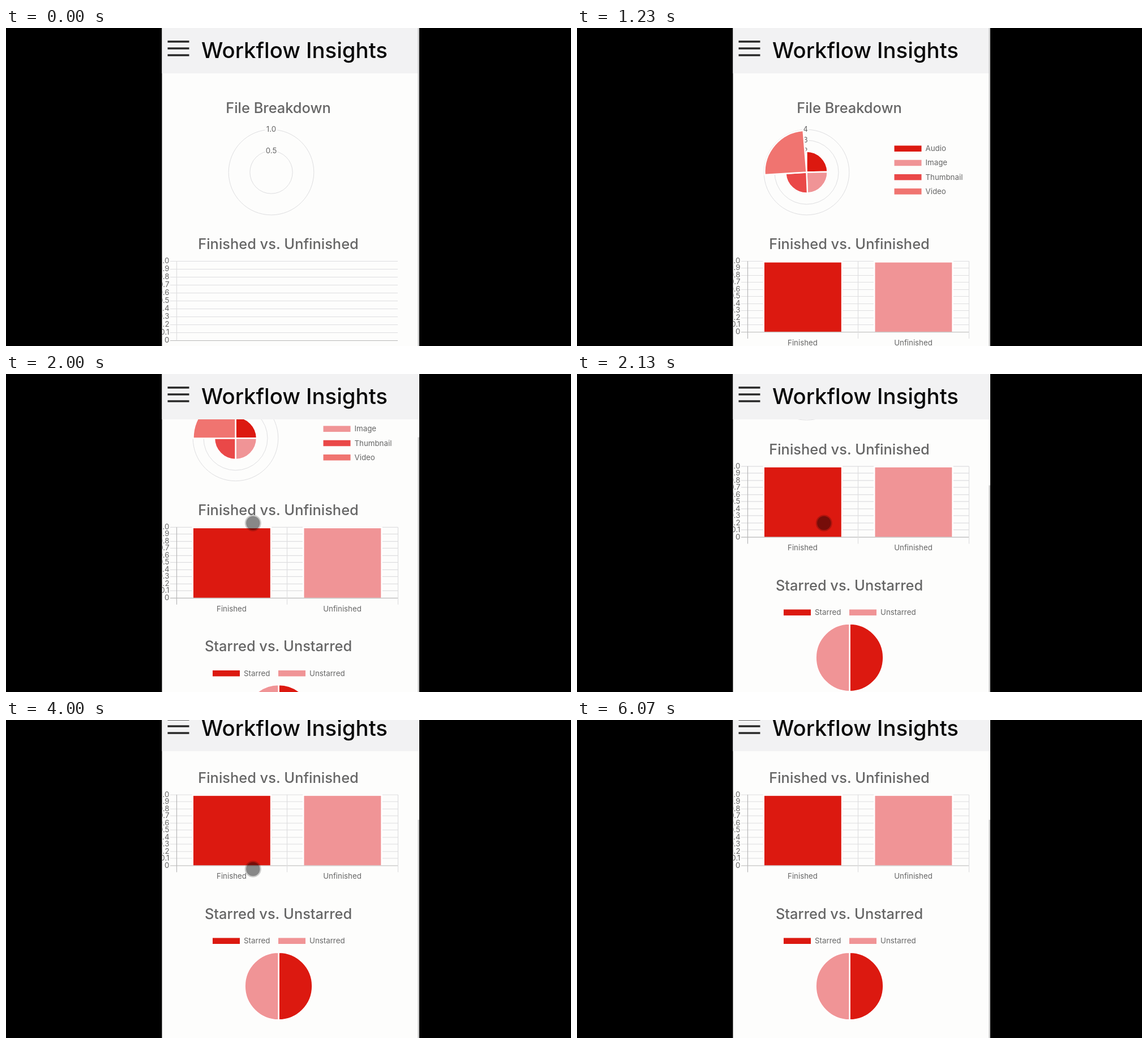
Animation of 998 by 561 pixels, one loop 6.13 s. Source, as an HTML page with a canvas:

```html
<!DOCTYPE html>
<html lang="en">
<head>
<meta charset="utf-8">
<title>Workflow Insights</title>
<style>
  html, body { margin: 0; width: 100%; height: 100%; overflow: hidden; background: #000; }
  canvas { display: block; width: 998px; height: 561px; }
</style>
</head>
<body>
<canvas id="stage" width="998" height="561"></canvas>
<script>
const ctx = document.getElementById('stage').getContext('2d');
const LOOP = 6130;
const DATA_AT = 30;
const FONT = 'Inter, "Open Sans", sans-serif';
const RED = '#dc1910', PINK = '#f09496', ROSE = '#ea4848', CORAL = '#f07470';
const PAGE = '#fdfdfc', GRID = '#dedee0', AXIS = '#b8b8b8', INK = '#666';

// [time, value] stops
const SCROLL = [[1830, 0], [1870, 7.5], [1930, 50], [2000, 140], [2060, 208],
  [2130, 248.5], [2200, 253], [2300, 254.5]];
const PAGE_SHIFT = [[2670, 0], [2700, 1.5], [2800, 14], [2900, 21], [3000, 24], [3070, 25]];
const POINTER = [[1600, 0], [1720, 1], [4400, 1], [4530, 0]];

const clamp = x => Math.max(0, Math.min(1, x));
const easeOutQuart = p => 1 - (1 - clamp(p)) ** 4;

function valueAt(stops, t) {
  if (t <= stops[0][0]) return stops[0][1];
  for (let i = 1; i < stops.length; i++) {
    const [t0, a] = stops[i - 1], [t1, b] = stops[i];
    if (t < t1) return a + (b - a) * (t - t0) / (t1 - t0);
  }
  return stops[stops.length - 1][1];
}

function text(str, x, y, size, { color = INK, weight = 400, align = 'center' } = {}) {
  ctx.font = `${weight} ${size}px ${FONT}`;
  ctx.fillStyle = color;
  ctx.textAlign = align;
  ctx.fillText(str, x, y + size * 0.36);
}

const heading = (str, y) => text(str, 481, y, 25.4, { weight: 500 });
const label = (str, x, y, align) => text(str, x, y, 13.3, { align });

function rect(x, y, w, h, color) {
  ctx.fillStyle = color;
  ctx.fillRect(x, y, w, h);
}

function line(x0, y0, x1, y1, color) {
  ctx.strokeStyle = color;
  ctx.lineWidth = 1.2;
  ctx.beginPath();
  ctx.moveTo(x0, y0);
  ctx.lineTo(x1, y1);
  ctx.stroke();
}

function disc(x, y, r, color) {
  ctx.fillStyle = color;
  ctx.beginPath();
  ctx.arc(x, y, r, 0, Math.PI * 2);
  ctx.fill();
}

function wedge(x, y, r, from, to, color) {
  ctx.beginPath();
  ctx.moveTo(x, y);
  ctx.arc(x, y, r, from, to);
  ctx.closePath();
  ctx.fillStyle = color;
  ctx.fill();
  ctx.strokeStyle = '#fff';
  ctx.lineWidth = 2.4;
  ctx.stroke();
}

function legend(str, x, y, color) {
  rect(x, y - 5, 48, 10.5, color);
  label(str, x + 55, y, 'left');
}

function rings(x, y, names) {
  const r = 75.3, n = names.length;
  names.forEach((name, i) => {
    const ring = r * (i + 1) / n;
    ctx.strokeStyle = GRID;
    ctx.lineWidth = 1;
    ctx.beginPath();
    ctx.arc(x, y, ring, 0, Math.PI * 2);
    ctx.stroke();
    const w = name.length > 1 ? 22 : 12;
    const tx = name.length > 1 ? x : x - 2;
    rect(tx - w / 2, y - ring - 8, w, 16, PAGE);
    label(name, tx, y - ring - 0.5);
  });
}

function polarChart(t) {
  heading('File Breakdown', 141);
  if (t < DATA_AT) {
    rings(468.5, 254.5, ['0.5', '1.0']);
    return;
  }
  const x = 405.5, y = 254.5;
  rings(x, y, ['1', '2', '3', '4']);
  const p = easeOutQuart((t - DATA_AT) / 1810);
  const parts = [['Audio', 2, RED], ['Image', 2, PINK], ['Thumbnail', 2, ROSE], ['Video', 4, CORAL]];
  const turn = Math.PI / 2 * p;
  parts.forEach(([name, value, color], i) => {
    const from = -Math.PI / 2 + i * turn;
    if (p > 0) wedge(x, y, 75 * value / 4 * p, from, from + turn, color);
    legend(name, 560.5, 212.5 + i * 25.2, color);
  });
}

function barChart(t) {
  heading('Finished vs. Unfinished', 381);
  const ready = t >= DATA_AT;
  const top = 411.3, base = ready ? 536.3 : 551.3, step = (base - top) / 10;
  for (let i = 0; i <= 10; i++) {
    const y = Math.floor(base - i * step + 0.01) + 0.5;
    line(290, y, 692, y, i ? GRID : AXIS);
    label(i ? (i / 10).toFixed(1) : '0', 288.5, y - 1, 'right');
  }
  line(301.5, top, 301.5, ready ? 548 : base, ready ? AXIS : GRID);
  if (!ready) return;

  line(496.5, top, 496.5, 548, GRID);
  line(692.5, top, 692.5, 548, GRID);
  const h = (base - top) * easeOutQuart((t - DATA_AT) / 1560);
  [['Finished', 331, RED], ['Unfinished', 526.5, PINK]].forEach(([name, x, color]) => {
    if (h > 2) {
      rect(x - 2.5, base - h - 0.5, 140.8, h - 0.5, '#fff');
      rect(x, base - h + 2, 135.8, h - 2.5, color);
    }
    label(name, x + 67.5, 555);
  });
}

function pieChart() {
  heading('Starred vs. Unstarred', 621);
  legend('Starred', 365, 669, RED);
  legend('Unstarred', 481, 669, PINK);
  wedge(481.5, 749, 59.8, -Math.PI / 2, Math.PI / 2, RED);
  wedge(481.5, 749, 59.8, Math.PI / 2, Math.PI * 1.5, PINK);
}

function header() {
  rect(275, 0, 455, 80, '#f2f2f3');
  for (const y of [24, 36, 48]) rect(285.5, y - 1.7, 38, 3.4, '#252525');
  text('Workflow Insights', 509.5, 39.2, 38.3, { color: '#080808', weight: 500 });
}

function draw(t) {
  const scroll = valueAt(SCROLL, t), shift = valueAt(PAGE_SHIFT, t), pointer = valueAt(POINTER, t);
  rect(0, 0, 998, 561, '#000');
  ctx.save();
  ctx.beginPath();
  ctx.rect(275.5, 0, 454.5, 561);
  ctx.clip();
  rect(275, 0, 455, 561, PAGE);

  ctx.save();
  ctx.translate(0, -shift - scroll);
  polarChart(t);
  barChart(t);
  pieChart();
  ctx.restore();

  ctx.save();
  ctx.translate(0, -shift);
  header();
  ctx.restore();

  rect(727.5, scroll * 0.79 - shift, 2.5, 600, '#c6c6c6');
  if (pointer > 0) {
    ctx.globalAlpha = pointer;
    disc(436.3, 263, 14.5, 'rgba(0,0,0,.2)');
    disc(436.3, 263, 12.2, 'rgba(0,0,0,.33)');
    ctx.globalAlpha = 1;
  }
  ctx.restore();
}

const start = performance.now();
function tick() {
  draw((performance.now() - start) % LOOP);
  requestAnimationFrame(tick);
}
draw(0);
requestAnimationFrame(tick);
</script>
</body>
</html>
```
